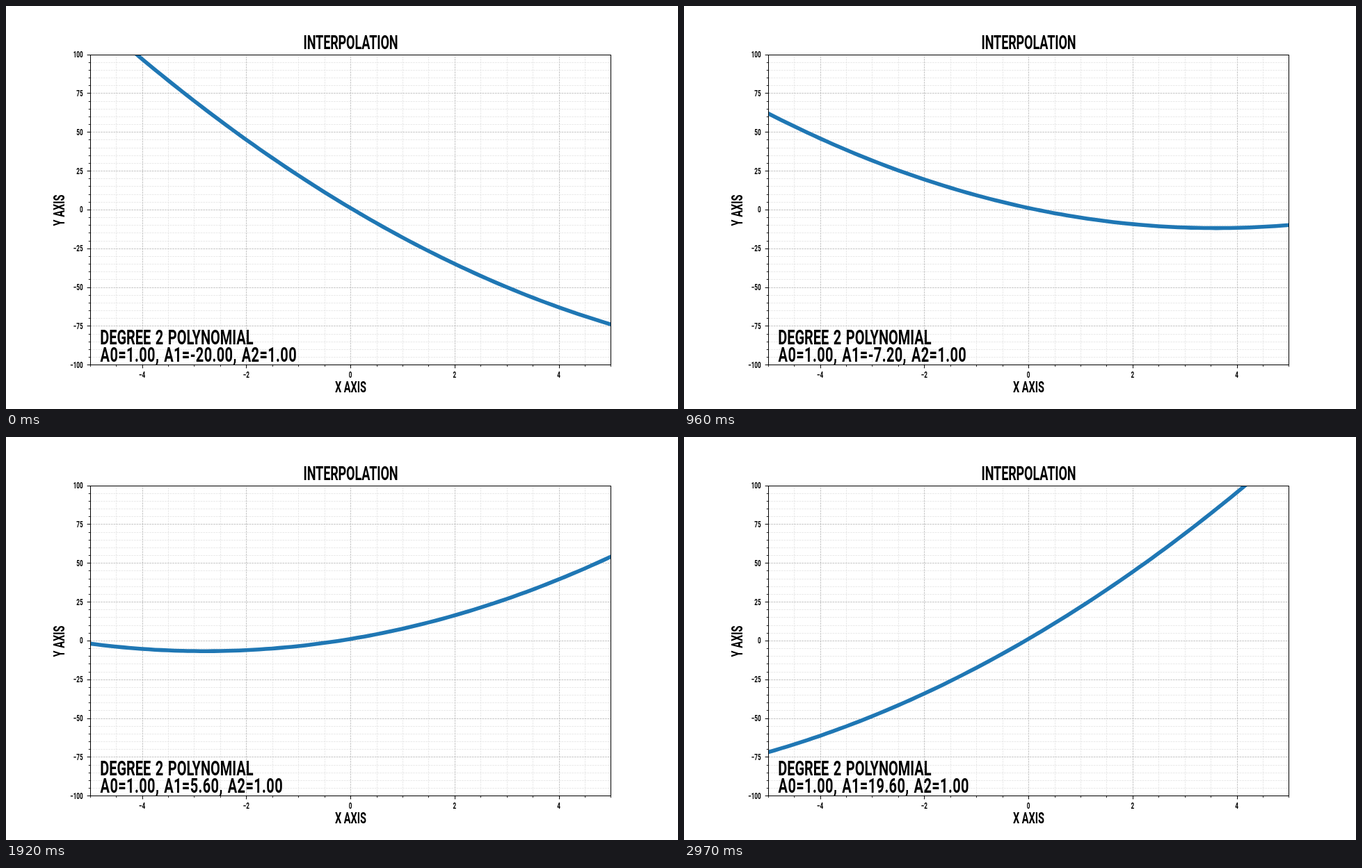
Recreate the animation shown at these times as an HTML page. Size 966 px wide and 580 px high, loop 3000 ms.

```html
<!DOCTYPE html>
<html lang="en">
<head>
<meta charset="utf-8">
<title>Interpolation</title>
<style>
  html, body { margin: 0; width: 100%; height: 100%; overflow: hidden; background: #fff; }
  svg { display: block; width: 966px; height: 580px; }
  text { font-family: Roboto, "Liberation Sans", sans-serif; font-weight: 700; fill: #000; }
  .tick { font-size: 12.1px; }
  .label { font-size: 21.7px; }
  .title { font-size: 27px; letter-spacing: -.2px; }
  .note { font-size: 29.8px; word-spacing: 2.4px; }
  .coefs { letter-spacing: .6px; }
  .axis { stroke: #000; stroke-width: 1; fill: none; }
  .axis.minor { stroke-width: .83; }
  .grid { stroke: #b0b0b0; stroke-width: .75; stroke-dasharray: 2.57 1.11; }
  .grid.minor { stroke: #dedede; stroke-width: .65; stroke-dasharray: 2.57 1.11; }
  .curve { stroke: #1f77b4; stroke-width: 5.56; fill: none; stroke-linecap: square; }
</style>
</head>
<body>
<svg id="stage" viewBox="0 0 966 580">
  <clipPath id="plot"><rect x="121" y="70" width="749" height="447"/></clipPath>
</svg>
<script>
const LOOP = 3000, STEP = 30;
const CONDENSE = 0.67;
const LEFT = 121.5, RIGHT = 869.5, TOP = 70.5, BOTTOM = 516.5;
const stage = document.getElementById('stage');

const px = x => 495.075 + x * 74.865;
const py = y => 292.9 - y * 2.233;
const snap = v => Math.floor(v + 0.5) + 0.5;

function add(tag, attrs) {
  const el = document.createElementNS('http://www.w3.org/2000/svg', tag);
  for (const key in attrs) el.setAttribute(key, attrs[key]);
  return stage.appendChild(el);
}

function line(cls, x1, y1, x2, y2) {
  return add('line', { class: cls, x1, y1, x2, y2 });
}

function label(cls, x, y, anchor, content, turn = 0) {
  const el = add('text', {
    class: cls,
    'text-anchor': anchor,
    transform: `translate(${x} ${y}) rotate(${turn}) scale(${CONDENSE} 1)`
  });
  el.textContent = content;
  return el;
}

function range(from, to, step) {
  const values = [];
  for (let v = from; v <= to; v += step) values.push(v);
  return values;
}

const signed = v => String(v).replace('-', '\u2212');
const xTicks = range(-5, 5, 0.5).map(v => ({ v, at: snap(px(v)), major: v % 2 === 0 }));
const yTicks = range(-100, 100, 5).map(v => ({ v, at: snap(py(v)), major: v % 25 === 0 }));
const kind = (base, tick) => tick.major ? base : base + ' minor';
const tickLength = tick => tick.major ? 4.86 : 2.78;

for (const t of xTicks) line(kind('grid', t), t.at, BOTTOM, t.at, TOP);
for (const t of yTicks) line(kind('grid', t), LEFT, t.at, RIGHT, t.at);

const curve = add('path', { class: 'curve', 'clip-path': 'url(#plot)' });

for (const t of xTicks) {
  line(kind('axis', t), t.at, BOTTOM, t.at, BOTTOM + tickLength(t));
  if (t.major) label('tick', px(t.v), 535.3, 'middle', signed(t.v));
}
for (const t of yTicks) {
  line(kind('axis', t), LEFT, t.at, LEFT - tickLength(t), t.at);
  if (t.major) label('tick', 110.6, py(t.v) + 4.5, 'end', signed(t.v));
}
add('rect', { class: 'axis', x: LEFT, y: TOP, width: RIGHT - LEFT, height: BOTTOM - TOP });

label('title', 495.5, 62, 'middle', 'INTERPOLATION');
label('label', 495.5, 556.2, 'middle', 'X AXIS');
label('label', 83.5, 294, 'middle', 'Y AXIS', -90);
label('note', 135.2, 486.7, 'start', 'DEGREE 2 POLYNOMIAL');
const coefs = label('note coefs', 135.6, 511.8, 'start', '');

function draw(time) {
  const a0 = 1, a2 = 1;
  const a1 = -20 + 0.4 * Math.floor((time % LOOP) / STEP);
  const points = range(-5, 5, 0.125).map(x =>
    `${px(x).toFixed(2)} ${py(a0 + a1 * x + a2 * x * x).toFixed(2)}`);
  curve.setAttribute('d', 'M' + points.join('L'));
  coefs.textContent = [a0, a1, a2].map((a, i) => `A${i}=${a.toFixed(2)}`).join(', ');
}

const start = performance.now();
function tick() {
  draw(performance.now() - start);
  requestAnimationFrame(tick);
}
tick();
</script>
</body>
</html>
```
